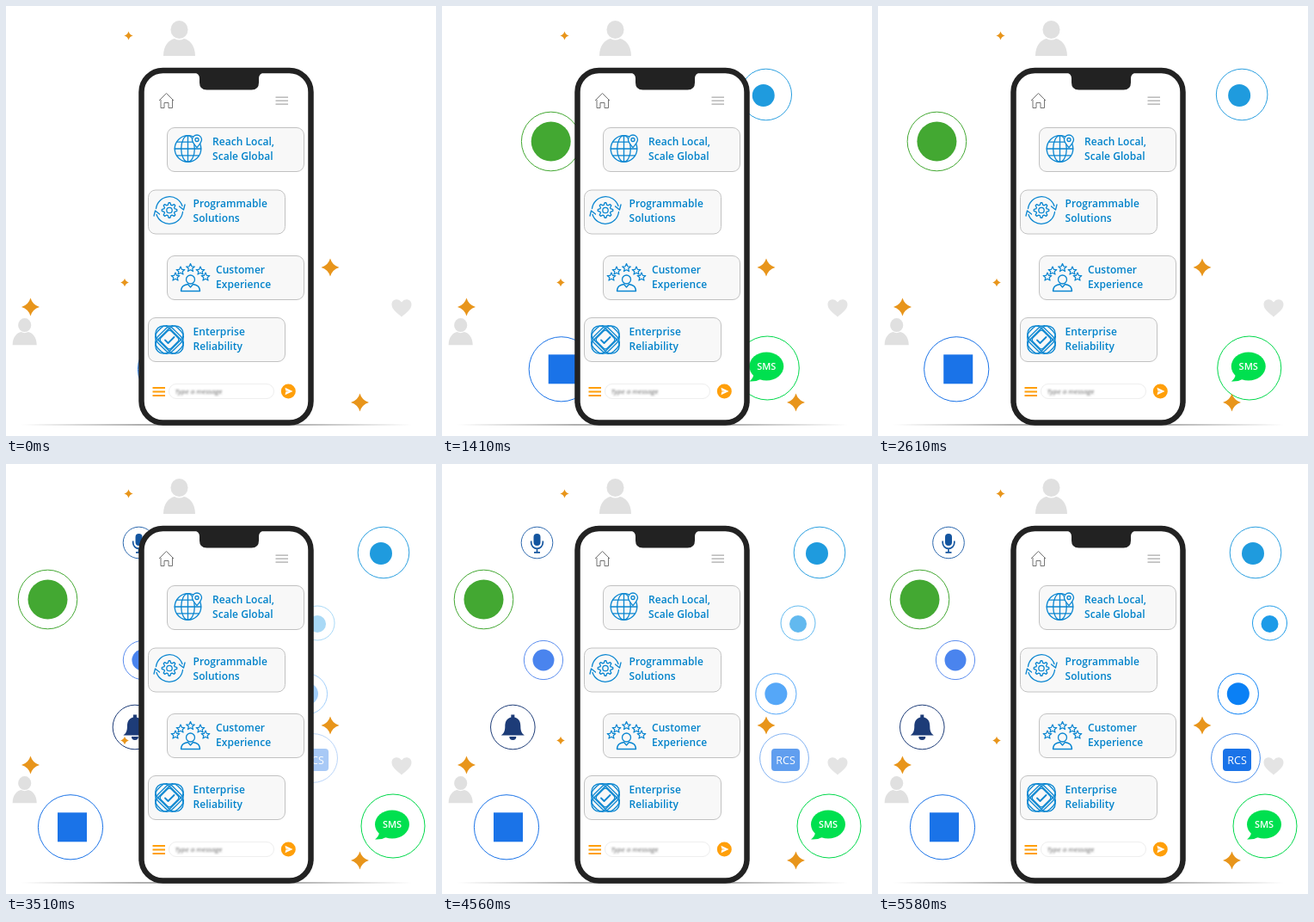
Write an HTML page that moves like this. It is 500x500 px and loops after 6280 ms.

```html
<!DOCTYPE html>
<html lang="en">
<head>
<meta charset="utf-8">
<title>Messaging channels</title>
<style>
  html, body { margin: 0; width: 100%; height: 100%; overflow: hidden; background: #fff; }
  svg { display: block; width: 100%; height: 100%; }
  text { font-family: "Open Sans", sans-serif; }
  .label { font-size: 12px; font-weight: 600; fill: #0082ca; letter-spacing: .05px; }
  .card { fill: #f8f8f8; stroke: #bbb; stroke-width: .9; }
  .line { fill: none; stroke: #0a86d1; stroke-width: 1.3; stroke-linecap: round; stroke-linejoin: round; }
  .tag { fill: #fff; text-anchor: middle; }
</style>
</head>
<body>
<svg viewBox="0 0 500 500">
  <defs>
    <linearGradient id="floor">
      <stop offset="0" stop-color="#888" stop-opacity="0"/>
      <stop offset=".3" stop-color="#888"/>
      <stop offset=".7" stop-color="#888"/>
      <stop offset="1" stop-color="#888" stop-opacity="0"/>
    </linearGradient>
    <filter id="blur" x="-10%" y="-50%" width="120%" height="200%"><feGaussianBlur stdDeviation=".8"/></filter>
    <path id="sparkle" d="M0-10.5Q2.4-2.4 10.5 0Q2.4 2.4 0 10.5Q-2.4 2.4-10.5 0Q-2.4-2.4 0-10.5z"/>
    <path id="star" d="M0-5L1.4-1.7 4.8-1.5 2.2.8 3 4.1 0 2.3-3 4.1-2.2.8-4.8-1.5-1.4-1.7z"/>
    <g id="person">
      <ellipse cy="-10.5" rx="10" ry="10.5"/>
      <path d="M-18.5 20C-18.5 7-11 1-5.5 0Q0 3 5.5 0C11 1 18.5 7 18.5 20z"/>
    </g>
    <g id="orbit">
      <rect x="-19" y="-9.5" width="38" height="19" rx="9.5"/>
      <rect x="-16.5" y="-12" width="33" height="24" rx="9"/>
    </g>
  </defs>

  <g fill="#e0e0e0">
    <use href="#person" x="201.5" y="38"/>
    <use href="#person" transform="translate(21.7 379) scale(.76)"/>
    <path fill="#e4e4e4" d="M460 361.500C455 357 448.500 353 448.500 347C448.500 340.500 456.500 339 460 344.500C463.500 339 471.500 340.500 471.500 347C471.500 353 465 357 460 361.500z"/>
  </g>
  <rect x="18" y="486.300" width="454" height="1.300" fill="url(#floor)"/>

  <g id="bubbles"></g>

  <rect x="157.500" y="75" width="197" height="409.500" rx="25" fill="#fff" stroke="#222" stroke-width="6.500"/>
  <path fill="#222" d="M219 77H300Q294 79 294 84V89Q294 97.500 285.500 97.500H233.500Q225 97.500 225 89V84Q225 79 219 77z"/>

  <g fill="none" stroke="#666" stroke-width=".9">
    <path d="M178 110L186.500 101.500 195 110M180 109V118.500H184V112.500H189V118.500H193.500V109"/>
    <path stroke="#aaa" stroke-width="1.300" d="M313.500 106.200H328M313.500 110.200H328M313.500 114.200H328"/>
  </g>

  <g id="cards"></g>

  <g class="line">
    <g transform="translate(211.500 166)">
      <circle r="15.300"/>
      <ellipse rx="7.800" ry="15.300"/>
      <path d="M0-15.300V15.300M-15.300 0H15.300M-13-7.800H13M-13 7.800H13"/>
      <path fill="#f8f8f8" d="M10.500-1.500C7.500-5 5-7.500 5-10.500A5.500 5.500 0 0 1 16-10.500C16-7.500 13.500-5 10.500-1.500z"/>
      <circle cx="10.500" cy="-10.500" r="2"/>
    </g>
    <g transform="translate(190 237.500)">
      <path d="M-15.500-2A15.700 15.700 0 0 1 15-5M15.500 2A15.700 15.700 0 0 1-15 5M11.500-4.500L16.500-.5 18-6.500M-11.500 4.500L-16.500 .5-18 6.500"/>
      <path id="gear"/>
      <circle r="3.200"/>
    </g>
    <g id="rating" stroke-width="1.200"></g>
    <g transform="translate(214.500 320)">
      <circle cy="-2" r="5"/>
      <path d="M-11 11.500C-11 5.500-7 4.500-3 3.500L0 7 3 3.500C7 4.500 11 5.500 11 11.500z"/>
    </g>
    <g transform="translate(190 388)">
      <use href="#orbit" transform="rotate(45)"/>
      <use href="#orbit" transform="rotate(-45)"/>
      <rect x="-8.500" y="-8.500" width="17" height="17" rx="3" transform="rotate(45)" fill="#f8f8f8"/>
      <path stroke-width="1.800" d="M-5 .5L-1.500 4 5.500-3"/>
    </g>
  </g>

  <path d="M170.500 444H185M170.500 448.500H185M170.500 453H185" stroke="#ff9f0a" stroke-width="2"/>
  <rect x="189.500" y="439.500" width="122" height="17" rx="8.500" fill="#fff" stroke="#eee"/>
  <text x="196.500" y="451" font-size="8" font-style="italic" fill="#666" filter="url(#blur)">Type a message</text>
  <circle cx="328.300" cy="448" r="8.500" fill="#ff9f0a"/>
  <path d="M324.500 443.800L333.500 448 324.500 452.200 325.300 448.600 329.500 448 325.300 447.400z" fill="#fff"/>

  <g id="sparkles" fill="#e8951b"></g>
</svg>
<script>
const LOOP = 6280, STEP = 30, LAST = 5580;
const byId = id => document.getElementById(id);
const dot = (x, y, r, color) => `<circle cx="${x}" cy="${y}" r="${r}" fill="${color}"/>`;

const mic = `<rect x="-4" y="-10.500" width="8" height="14" rx="4" fill="#14559f"/>
  <path d="M-6.800-2V0A6.800 6.800 0 0 0 6.800 0V-2M0 7V11M-3.500 11.300H3.500" fill="none" stroke="#14559f" stroke-width="1.700"/>`;
const bell = `<path fill="#1d3c78" d="M-2-14.500H2V-11.500C8-10 9-5 9-1C9 5 10.500 7 13.500 9.500H-13.500C-10.500 7-9 5-9-1C-9-5-8-10-2-11.500zM-4 11H4A4 4 0 0 1-4 11z"/>`;
const sms = `<path fill="#00e04f" d="M-15 8Q-16 13-20 15.500Q-12 16-7 13z"/>
  <ellipse cy="-2" rx="20" ry="16.500" fill="#00e04f"/>
  <text class="tag" y="2" font-size="11" font-weight="600">SMS</text>`;
const rcs = `<rect x="-15" y="-11" width="33" height="26" rx="4" fill="#1a73e8"/>
  <text class="tag" x="1.500" y="6.500" font-size="12.500">RCS</text>`;

// Each bubble slides out sideways from behind the phone.
const bubbles = [
  { y: 157.5, r: 34.3, from: 190.8, to: 48.5, start: 90, end: 3020, color: "#43a832", icon: dot(0, 0, 23, "#43a832") },
  { y: 103, r: 29.8, from: 325.7, to: 439, start: 90, end: 3020, color: "#2a9fe0", icon: dot(-3, 1, 13, "#1f9bde") },
  { y: 422.3, r: 37.6, from: 191, to: 75, start: 90, end: 3020, color: "#1a73e8", icon: `<rect x="-15" y="-17" width="34" height="34" fill="#1a73e8"/>` },
  { y: 421, r: 37, from: 319.5, to: 450, start: 90, end: 3020, color: "#00d84a", icon: `<g transform="translate(-1)">${sms}</g>` },
  { y: 91.5, r: 18.3, from: 184.7, to: 82, start: 2790, end: 5240, color: "#2c68ae", icon: mic },
  { y: 228, r: 22.6, from: 187, to: 90, start: 2790, end: 5277, color: "#5b8def", icon: dot(0, 0, 12.5, "#4a84ee") },
  { y: 306, r: 25.8, from: 196.3, to: 51.3, start: 2790, end: 5042, color: "#1d3c78", icon: bell },
  { y: 185, r: 20, from: 326.4, to: 455.5, start: 2790, end: 5398, color: "#1d9be8", icon: dot(0, 1, 10, "#1d9be8"), fades: true },
  { y: 267.3, r: 23.6, from: 323.6, to: 418.8, start: 2790, end: 5391, color: "#0a80f5", icon: dot(0, 0, 13, "#0a80f5"), fades: true },
  { y: 342, r: 28.4, from: 329, to: 416, start: 2790, end: 5021, color: "#4a8fec", icon: rcs, fades: true },
];
byId("bubbles").innerHTML = bubbles.map(b =>
  `<g><circle r="${b.r}" fill="#fff" stroke="${b.color}"/>${b.icon}</g>`).join("");
const nodes = byId("bubbles").children;

const cards = [
  [187.5, 141.5, 240, "Reach Local,", "Scale Global"],
  [165.5, 214, 217.5, "Programmable", "Solutions"],
  [187.5, 290.5, 244, "Customer", "Experience"],
  [165.5, 362.5, 217.5, "Enterprise", "Reliability"],
];
byId("cards").innerHTML = cards.map(([x, y, tx, top, bottom]) =>
  `<rect class="card" x="${x}" y="${y}" width="159" height="51" rx="8.500"/>
   <text class="label" x="${tx}" y="${y + 20}">${top}</text>
   <text class="label" x="${tx}" y="${y + 37}">${bottom}</text>`).join("");

byId("rating").innerHTML = [[197, 315], [203, 308], [214.5, 304.5], [226, 308], [232, 315]]
  .map(([x, y]) => `<use href="#star" x="${x}" y="${y}"/>`).join("");

byId("sparkles").innerHTML = [[142.5, 34.5, .48], [377, 304, 1], [138, 321.5, .46], [28.5, 350, 1], [411.5, 461, 1]]
  .map(([x, y, s]) => `<use href="#sparkle" transform="translate(${x} ${y}) scale(${s})"/>`).join("");

const teeth = Array.from({ length: 32 }, (_, i) => {
  const angle = (i - .5) * Math.PI / 16;
  const radius = i % 4 < 2 ? 8.8 : 6.3;
  return `${(radius * Math.cos(angle)).toFixed(2)} ${(radius * Math.sin(angle)).toFixed(2)}`;
});
byId("gear").setAttribute("d", `M${teeth.join("L")}z`);

const clamp = v => Math.max(0, Math.min(1, v));

function draw(now) {
  const t = Math.min(LAST, Math.floor(now % LOOP / STEP) * STEP);
  const fade = clamp(.376 + (t - 3510) * .0003);
  bubbles.forEach((b, i) => {
    const x = b.from + (b.to - b.from) * clamp((t - b.start) / (b.end - b.start));
    nodes[i].setAttribute("transform", `translate(${x.toFixed(2)} ${b.y})`);
    if (b.fades) nodes[i].setAttribute("opacity", fade);
  });
}

let origin;
function tick(now) {
  origin ??= now;
  draw(now - origin);
  requestAnimationFrame(tick);
}
draw(0);
requestAnimationFrame(tick);
</script>
</body>
</html>
```
